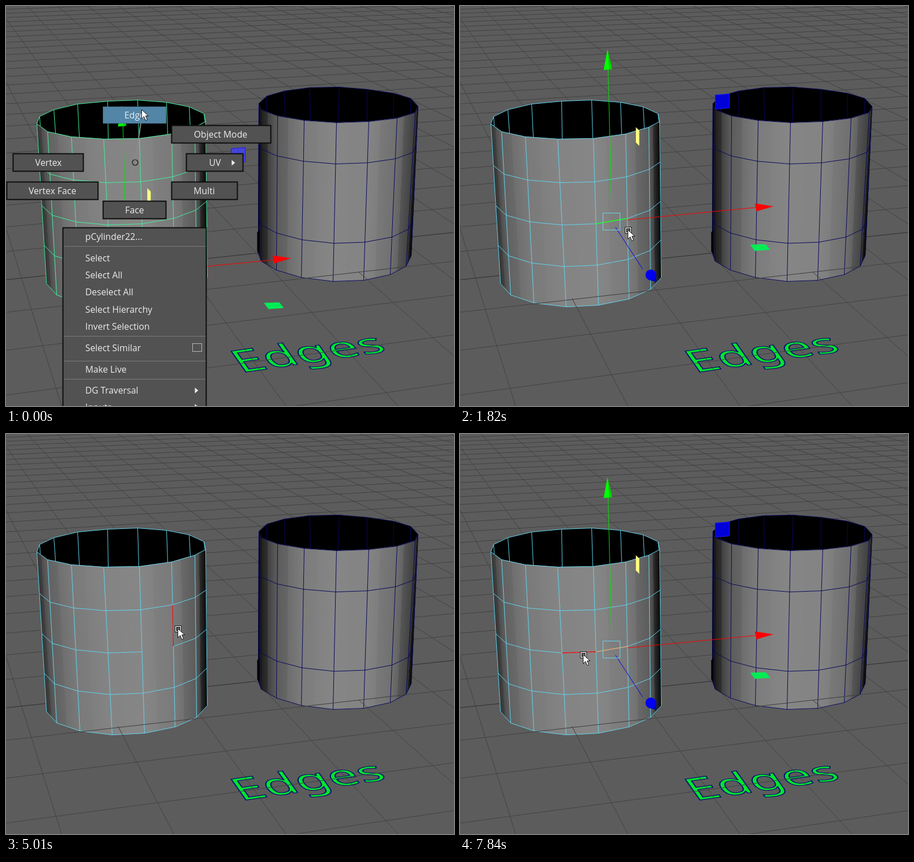
Animation of 791 by 708 pixels, one loop 7.99 s. Source, as an HTML page with a canvas:

```html
<!DOCTYPE html>
<html lang="en">
<head>
<meta charset="utf-8">
<title>Edge selection</title>
<style>
  html, body { margin: 0; width: 100%; height: 100%; overflow: hidden; background: #5c5c5c; }
  canvas { display: block; }
</style>
</head>
<body>
<canvas id="stage" width="791" height="708"></canvas>
<script>
const W = 791, H = 708, LOOP = 7990;
const ctx = document.getElementById('stage').getContext('2d');
const ROWS = [0, .26, .512, .76, 1];

// start ms, cursor x, y, mode, hovered edge, minus sign
// edges: v<col><row> vertical, h<row><col> ring, back = far wall
const STEPS = [
  [0, 240, 184, 'menu', ''],
  [560, 238, 189, 'edges', ''],
  [690, 238, 189, 'edges', 'back'],
  [840, 242, 303, 'edges', 'v40'],
  [990, 241, 350, 'edges', 'v41'],
  [1140, 246, 420, 'edges', 'v42'],
  [1270, 260, 384, 'edges', 'h24'],
  [1420, 266, 390, 'edges', 'h24'],
  [1820, 297, 397, 'picked', 'h24'],
  [1970, 345, 436, 'picked', ''],
  [2090, 386, 467, 'picked', ''],
  [2520, 386, 467, 'picked', '', 1],
  [2920, 386, 467, 'gone', '', 1],
  [3210, 386, 467, 'gone', ''],
  [3770, 352, 440, 'gone', ''],
  [3900, 345, 414, 'gone', 'v62'],
  [4050, 324, 330, 'gone', 'v61'],
  [4200, 250, 278, 'gone', 'v40'],
  [4320, 192, 280, 'gone', 'v30'],
  [4440, 186, 350, 'gone', 'v31'],
  [4590, 192, 452, 'gone', 'v32'],
  [4740, 300, 480, 'gone', 'v53'],
  [4860, 336, 412, 'gone', 'v62'],
  [5010, 304, 345, 'gone', 'v51'],
  [5130, 246, 290, 'gone', 'v40'],
  [5250, 212, 285, 'gone', 'v40'],
  [5400, 226, 340, 'gone', 'v41'],
  [5520, 222, 385, 'gone', 'h23'],
  [5640, 238, 425, 'gone', 'v42'],
  [5770, 240, 470, 'gone', 'v43'],
  [6850, 240, 470, 'gone', 'v43', 1],
  [7150, 240, 470, 'picked', 'v43', 1],
  [7400, 223, 427, 'picked', 'v42'],
  [7550, 218, 408, 'picked', 'v42'],
  [7690, 217, 399, 'picked', 'h23'],
  [7840, 218, 391, 'picked', 'h23']
];

const pairs = s => s.split(' ').map(p => p.split(',').map(Number));
const lerp = (a, b, t) => a + (b - a) * t;

const LEFT = {
  top: pairs('54,208 73,222 115,231 172,235 235,234 292,226 333,214 352,204'),
  low: pairs('71,491 89,511 130,525 187,532 244,529 298,518 336,501 355,480'),
  back: pairs('54,208 59,195 84,183 126,173 179,168 232,166 283,170 323,178 349,190 352,204'),
  drop: pairs('60,212 87,225 129,232 180,235 234,234 285,227 325,217 351,205'),
  shade: [52, 98, 122, 132, 134, 122, 92, 10],
  rows: [1, 2, 3]
};
const RIGHT = {
  top: pairs('446,172 450,183 479,194 526,202 583,206 640,204 690,198 722,188 727,177'),
  low: pairs('445,436 450,451 477,467 521,480 577,487 631,485 678,475 706,460 715,441'),
  back: pairs('446,172 460,159 491,150 536,144 588,143 637,147 684,154 714,163 727,177'),
  drop: pairs('460,187 492,196 537,203 586,206 637,204 683,199 714,191'),
  shade: [0, 30, 92, 124, 134, 132, 112, 66, 8],
  rows: [1, 3]
};

function trace(pts, close) {
  ctx.beginPath();
  pts.forEach(([x, y]) => ctx.lineTo(x + .5, y + .5));
  if (close) ctx.closePath();
}
function line(pts, color, width = 1) {
  trace(pts);
  ctx.strokeStyle = color;
  ctx.lineWidth = width;
  ctx.stroke();
}
function poly(pts, fill, edge) {
  trace(pts, true);
  ctx.fillStyle = fill;
  ctx.fill();
  if (edge) { ctx.strokeStyle = edge; ctx.lineWidth = 1; ctx.stroke(); }
}
function box(x, y, r, b, fill, edge, width = 1) {
  ctx.fillStyle = fill;
  ctx.fillRect(x, y, r - x, b - y);
  if (edge) {
    ctx.strokeStyle = edge;
    ctx.lineWidth = width;
    ctx.strokeRect(x + .5, y + .5, r - x - 1, b - y - 1);
  }
}
const at = (c, col, row) => [0, 1].map(i => lerp(c.top[col][i], c.low[col][i], ROWS[row]));
const gray = v => `rgb(${v | 0},${v | 0},${v | 0})`;

// ground plane: two line families meeting at (-205,-262) and (7040,-262)
const VX = -205, VY = -262, FAR = 7040;
const depthY = n => VY + 1 / (.0013405 - .000096 * n);
const acrossY = (n, x) => lerp(depthY(n), VY, x / FAR);
function alongX(k, y) {
  const ax = FAR - 7013 / (1 + .02096 * k), ay = 484 - .106 * ax;
  return VX + (ax - VX) * (y - VY) / (ay - VY);
}

function grid() {
  for (let n = 4; n > -27; n--)
    line([[0, acrossY(n, 0)], [W, acrossY(n, W)]], n ? '#424242' : '#2e2e2e');
  for (let k = 0; k < 28; k++)
    line([[alongX(k, -9), -9], [alongX(k, H), H]], '#424242');
}

function floorText() {
  ctx.font = '100px "Noto Sans", sans-serif';
  ctx.textAlign = 'left';
  ctx.textBaseline = 'alphabetic';
  let em = 0;
  [...'Edges'].forEach((ch, i) => {
    const s = 1 - .025 * i;
    ctx.save();
    ctx.transform(.92, -.134, .364 * s, .518 * s, 414.8 + 92 * em, 649.3 - 13.4 * em);
    ctx.fillStyle = '#00e62e';
    ctx.strokeStyle = '#0a1a6a';
    ctx.lineWidth = 2.4;
    ctx.fillText(ch, 0, 0);
    ctx.strokeText(ch, 0, 0);
    em += ctx.measureText(ch).width / 100;
    ctx.restore();
  });
}

function cylinder(c, wire) {
  const last = c.top.length - 1;
  poly([...c.back, ...c.top.slice().reverse()], '#000');
  for (let i = 0; i < last; i++) {
    const [a, b, d, e] = [c.top[i], c.top[i + 1], c.low[i + 1], c.low[i]];
    const my = (a[1] + e[1]) / 2, mx = (a[0] + e[0]) / 2, wide = (b[0] + d[0]) / 2 - mx;
    const slant = (e[0] - a[0]) / (e[1] - a[1]);
    const g = ctx.createLinearGradient(mx, my, mx + wide, my - wide * slant);
    const s = c.shade[i], t = c.shade[i + 1];
    g.addColorStop(0, gray(s));
    g.addColorStop(.42, gray(lerp(s, t, .3)));
    g.addColorStop(.43, gray(lerp(s, t, .55)));
    g.addColorStop(1, gray(t));
    poly([a, b, d, e], g, g);
  }
  line(c.back, wire);
  line(c.top, wire);
  line(c.low, wire);
  c.drop.forEach((p, i) => line([c.back[i + 1], p], wire));
  c.top.forEach((p, i) => line([p, c.low[i]], wire));
}
function rings(c, wire, skip) {
  for (const r of c.rows)
    for (let i = 0; i < c.top.length - 1; i++)
      if (!(skip && r === 2 && i === 4)) line([at(c, i, r), at(c, i + 1, r)], wire);
}
function edge(id, color) {
  if (id === 'back') return line([LEFT.back[5], LEFT.drop[4]], color, 1.4);
  const a = +id[1], b = +id[2];
  line(id[0] === 'v' ? [at(LEFT, a, b), at(LEFT, a, b + 1)]
                     : [at(LEFT, b, a), at(LEFT, b + 1, a)], color, 1.4);
}

// parts of the move tool: kind, colour, points, offset in menu, offset when picked
const TOOL = [
  ['plane', '#4545dc', '393,151 418,149 418,174 394,176', '4,101', '57,6'],
  ['poly', '#ffff80', '245,208 251,214 251,241 245,235', '4,114', '65,6'],
  ['poly', '#00ec55', '451,416 478,415 486,425 459,427', '4,109', '61,6'],
  ['line', '#00e600', '209,347 203,107', '3,104', '58,4'],
  ['poly', '#00ff00', '200,70 208,105 193,107', '4,106', '60,6'],
  ['poly', '#00d000', '200,70 208,105 203,107', '4,106', '60,6'],
  ['line', '#ff0000', '240,373 467,351', '4,98', '56,5'],
  ['poly', '#ff0000', '466,344 499,349 469,358', '4,97', '54,5'],
  ['line', '#0000f0', '217,386 265,460', '4,102', '57,5'],
  ['cone', '#0000ee', '271,470 280,482', '4,102', '66,6'],
  ['box', '#66d6ef', '195,360 225,360 225,390 195,390 195,360', '4,102', '57,6']
];
function moveTool(mode) {
  for (const [kind, color, pts, inMenu, inPick] of TOOL) {
    const [[dx, dy]] = pairs(mode === 'menu' ? inMenu : mode === 'picked' ? inPick : '0,0');
    const p = pairs(pts).map(([x, y]) => [x + dx, y + dy]);
    if (kind === 'line' || kind === 'box') line(p, color);
    else if (kind === 'poly') poly(p, color);
    else if (kind === 'plane') {
      poly(p, mode === 'picked' ? '#0000d8' : color, '#1c1cf0');
      if (mode !== 'picked') {
        line([[p[0][0], p[0][1] + 13], [p[1][0], p[1][1] + 13]], '#3434c8');
        line([[p[0][0] + 12, p[0][1]], [p[3][0] + 12, p[3][1]]], '#3434c8');
      }
    } else {
      const [[x, y], tip] = p;
      poly([[x + 9, y - 4], tip, [x - 5, y + 8]], '#0000c0');
      ctx.beginPath();
      ctx.arc(x, y, 9.5, 0, 7);
      ctx.fillStyle = color;
      ctx.fill();
    }
  }
  if (mode === 'edges') box(210, 375, 212, 376, '#66d6ef');
}

function label(str, x, y, align = 'left') {
  ctx.font = '15.8px "Open Sans", sans-serif';
  ctx.textAlign = align;
  ctx.textBaseline = 'alphabetic';
  ctx.fillStyle = '#ececec';
  ctx.fillText(str, x, y + 6);
}
const arrow = (x, y) => poly([[x - 3, y - 5], [x + 3, y], [x - 3, y + 5]], '#eee');

function menu() {
  const face = '#525252', rim = '#0c0c0c';
  line([[228, 272], [240, 190]], '#8a8a8a', 2);
  [['Edge', 171, 178, 283, 208, 227], ['Object Mode', 292, 211, 468, 243, 379],
   ['Vertex', 12, 261, 137, 293, 75], ['UV', 318, 261, 419, 293, 369],
   ['Vertex Face', 1, 311, 163, 343, 82], ['Multi', 292, 311, 409, 343, 350],
   ['Face', 171, 345, 283, 377, 227]
  ].forEach(([name, x, y, r, b, mid], i) => {
    box(x, y, r, b, i ? face : '#5285a6', i ? rim : '#4a7796', i ? 2 : 1);
    label(name, mid, (y + b) / 2, 'center');
  });
  arrow(401, 277);
  ctx.beginPath();
  ctx.arc(228, 277, 5, 0, 7);
  ctx.strokeStyle = '#111';
  ctx.lineWidth = 1.2;
  ctx.stroke();

  box(100, 392, 354, 720, face, rim, 2);
  [425, 584, 628, 660].forEach(y => line([[102, y], [352, y]], '#7c7c7c'));
  Object.entries({
    'pCylinder22...': 408, 'Select': 446, 'Select All': 476, 'Deselect All': 506,
    'Select Hierarchy': 537, 'Invert Selection': 567, 'Select Similar': 605,
    'Make Live': 643, 'DG Traversal': 680, 'Inputs': 710
  }).forEach(([name, y]) => label(name, 140, y));
  box(329, 597, 346, 612, face, '#b8b8b8');
  arrow(336, 680);
  arrow(336, 709);
}

function cursor(x, y, boxed, minus) {
  if (boxed) {
    [['#111', 6], ['#fff', 5], ['#111', 3]].forEach(([c, r]) => {
      ctx.strokeStyle = c;
      ctx.lineWidth = 1;
      ctx.strokeRect(x - r + .5, y - r + .5, r * 2 - 1, r * 2 - 1);
    });
  }
  if (minus) box(x + 7, y - 3, x + 18, y - 1, '#151515');
  poly(pairs('0,0 0,16 4,12 7,19 10,18 7,11 12,11').map(([a, b]) => [x - 1 + a, y - 1 + b]),
    '#fff', '#111');
}

function draw([, x, y, mode, hover, minus]) {
  const inMenu = mode === 'menu';
  const wire = inMenu ? '#43f0a0' : '#62d4ee';
  box(0, 0, W, H, '#5c5c5c');
  floorText();
  grid();
  cylinder(RIGHT, '#08085e');
  rings(RIGHT, '#08085e');
  poly([[443, 400], [447, 396], [447, 438], [443, 434]], '#000');
  cylinder(LEFT, wire);
  rings(LEFT, wire, mode === 'gone');

  // ground lines passing in front of the cylinders
  [[130, 337, 1, 517, 532], [521, 704, 4, 470, 484]].forEach(([a, b, k, y0, y1]) => {
    line([[a, acrossY(1, a)], [b, acrossY(1, b)]], '#3c3c3c');
    line([[alongX(k, y0), y0], [alongX(k, y1), y1]], '#3c3c3c');
  });

  if (mode === 'edges') for (let i = 0; i < 8; i++) edge('v' + i + 2, '#c8946a');
  if (mode === 'picked') edge('h24', hover === 'h24' ? '#18ff18' : '#dca070');
  if (hover && !(mode === 'picked' && hover === 'h24')) edge(hover, '#f01010');
  if (mode !== 'gone') moveTool(mode);
  if (inMenu) menu();
  cursor(x, y, !inMenu, minus);
}

let shown = null;
function tick() {
  const t = performance.now() % LOOP;
  const step = STEPS.filter(s => s[0] <= t).pop();
  if (step !== shown) draw(shown = step);
  requestAnimationFrame(tick);
}
tick();
</script>
</body>
</html>
```
